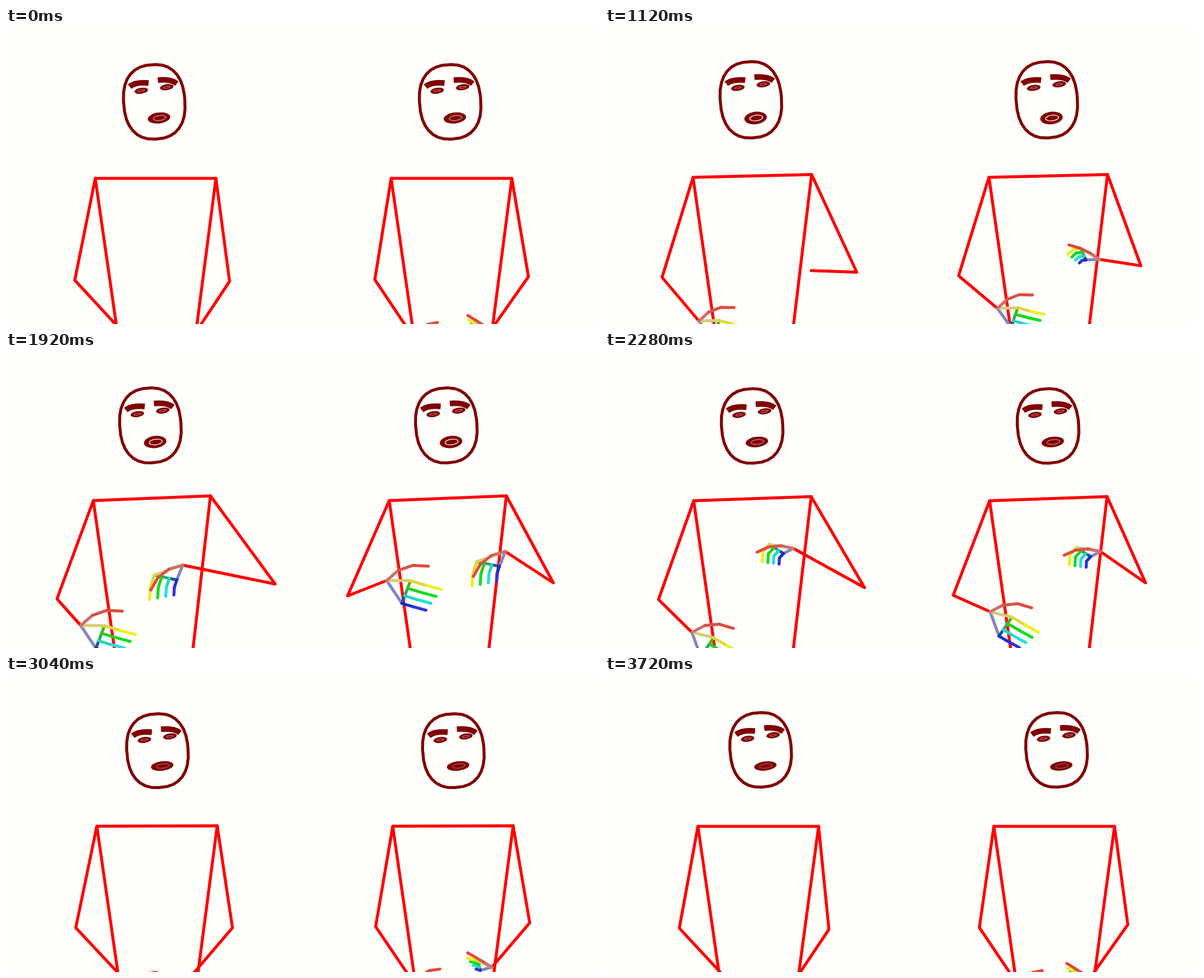
These frames come from a looping animation (1000x500 px, 3.76 s). An HTML page with a canvas:

```html
<!DOCTYPE html>
<html lang="en">
<head>
<meta charset="utf-8">
<title>Pose pair</title>
<style>
html, body { margin: 0; width: 100%; height: 100%; overflow: hidden; background: #fefefb; }
canvas { display: block; width: 100vw; height: 100vh; }
</style>
</head>
<body>
<canvas id="stage" width="1000" height="500"></canvas>
<script>
const ctx = document.getElementById('stage').getContext('2d');
const LOOP = 3760, STEP = 40, PANEL = 499;
const PAPER = '#fefefb', SKIN = '#800000', BONE = '#ff0000';

// left elbow, left wrist, right elbow, right wrist
const ARMS = [
  {
    rest: [116, 426, 212, 530, 377, 428, 308, 532],
    up: [89, 418, 124, 471, 453, 402, 375, 326],
    chest: [86, 417, 126, 462, 454, 392, 298, 360],
    half: [94, 419, 164, 483, 424, 403, 334, 308]
  },
  {
    rest: [622, 425, 688, 524, 881, 420, 818, 510],
    up: [585, 414, 646, 439, 915, 389, 844, 309],
    chest: [576, 412, 642, 386, 923, 390, 842, 337],
    half: [597, 410, 656, 483, 902, 390, 830, 337]
  }
];

// thumb [aim, segment, bend], first and last knuckle, fingers [aim, first and last segment, bend]
const SPREAD = [[-40, 26, 22], [40, 1, 25, 39], [18, 27, 21, -2]];
const GRIPS = {
  rest: [[212, 24, 0], [-34, -14, -30, 9], [205, 14, 5, 0]],
  up: [[216, 21, -15], [-38, -27, -24, -4], [152, 15, 9, -60]],
  chest: [[164, 24, -22], [-48, 17, -10, 25], [108, 21, 13, -14]]
};
GRIPS.half = GRIPS.up;
const TILT = { rest: -16, up: 6, chest: -1, half: 24 };
const SIZE = { rest: .64, up: 1, chest: 1, half: .9 };
const RAISE = { rest: 0, up: 1, chest: 1, half: .8 };

// wrist to knuckle, then two finger segments
const COLORS = [
  ['#cd7068', '#d4544a', '#df4b3a'],
  ['#d4cd74', '#dada35', '#f0ee20'],
  ['#5aa81e', '#1fd21f', '#14dc20'],
  ['#2aa868', '#28d4c0', '#20e0e0'],
  ['#2050a0', '#1030c8', '#3030e0']
];

const rad = deg => deg * Math.PI / 180;
const ease = u => u * u * (3 - 2 * u);
const mix = (a, b, u) => Array.isArray(a) ? a.map((v, i) => mix(v, b[i], u)) : a + (b - a) * u;

// eased value at time t from [time, value] keys
function track(t, ...keys) {
  const i = Math.max(1, keys.findIndex(key => key[0] > t));
  const [t0, a] = keys[i - 1], [t1, b] = keys[i];
  return mix(a, b, ease((t - t0) / (t1 - t0)));
}
const gesture = (t, p) => track(t, [0, p.rest], [760, p.rest], [1400, p.up], [1920, p.chest],
  [2600, p.half], [3150, p.rest], [LOOP, p.rest]);

function line(pts, color = BONE) {
  ctx.beginPath();
  for (let i = 0; i < pts.length; i += 2) ctx.lineTo(pts[i], pts[i + 1]);
  ctx.strokeStyle = color;
  ctx.lineWidth = 5;
  ctx.stroke();
}

function oval(x, y, rx, ry, tilt) {
  ctx.beginPath();
  ctx.ellipse(x, y, rx, ry, tilt, 0, 7);
}

function eye(x, y) {
  oval(x, y, 11.5, 5, -.14);
  ctx.fill();
  oval(x, y, 6, 1.6, -.14);
  ctx.strokeStyle = PAPER;
  ctx.lineWidth = .5;
  ctx.stroke();
}

function brow(x, y, dir) {
  ctx.beginPath();
  ctx.moveTo(x - 17 * dir, y + 6);
  ctx.quadraticCurveTo(x - 7 * dir, y - 2, x + 15 * dir, y);
  ctx.strokeStyle = SKIN;
  ctx.lineWidth = 9.5;
  ctx.stroke();
}

function mouth(x, y, height) {
  oval(x, y, 19, height / 2 - .8, -.12);
  ctx.fill();
  oval(x + 1, y, 11, height * .21, -.12);
  ctx.strokeStyle = PAPER;
  ctx.lineWidth = Math.max(.4, (height - 15) / 6);
  ctx.stroke();
}

function head(left, nod, open) {
  const top = 62 + nod, chin = 187.5 + nod * .4;
  const cx = left + 52, cy = (top + chin) / 2, half = (chin - top) / 2;
  const round = v => Math.sign(v) * Math.abs(v) ** (2 / 2.4);
  ctx.beginPath();
  for (let a = 0; a < 6.28; a += .2) {
    const x = round(Math.cos(a)) * 51.5, y = round(Math.sin(a)) * half;
    ctx.lineTo(cx + x + .08 * y, cy + y - .08 * x);
  }
  ctx.closePath();
  ctx.strokeStyle = ctx.fillStyle = SKIN;
  ctx.lineWidth = 5;
  ctx.stroke();

  const ey = 106 + nod;
  eye(left + 30, ey);
  eye(left + 73, ey - 6);
  ctx.lineCap = 'butt';
  brow(left + 27.5, ey - 13, 1);
  brow(left + 73, ey - 18, -1);
  ctx.lineCap = 'round';
  mouth(left + 60, 152, open);
}

function chain(x, y, aim, length, bend, count) {
  const pts = [x, y];
  for (let i = 0; i < count; i++) {
    const a = rad(aim + bend * i);
    pts.push(x += Math.cos(a) * length, y += Math.sin(a) * length);
  }
  return pts;
}

function hand(x, y, [thumb, [ax, ay, bx, by], [aim, first, last, bend]], size, tilt = 0) {
  const fingers = [chain(0, 0, ...thumb, 3)];
  for (let k = 0; k < 4; k++) {
    const u = k / 3;
    fingers.push(chain(mix(ax, bx, u), mix(ay, by, u), aim, mix(first, last, u), bend, 2));
  }
  ctx.save();
  ctx.translate(x, y);
  ctx.rotate(rad(tilt));
  const scale = pts => pts.map(v => v * size);
  line(scale([0, 0, ...fingers[4].slice(0, 2)]), '#8484c4');
  for (let f = 4; f >= 0; f--) {
    const root = f > 1 ? fingers[f - 1].slice(0, 2) : [0, 0];
    const pts = f ? [...root, ...fingers[f]] : fingers[0];
    COLORS[f].forEach((color, s) => line(scale(pts.slice(s * 2, s * 2 + 4)), color));
  }
  ctx.restore();
}

function figure(t, side) {
  const x = side * PANEL;
  const sway = track(t, [0, 0], [1920, -6.5], [2600, 2], [LOOP, 12.5]);
  const nod = track(t, [0, 0], [760, 1], [1140, -5], [1400, -2], [3040, 2], [LOOP, 0]);
  const open = track(t, [0, 20], [760, 19], [1400, 25], [2600, 18], [LOOP, 17]);
  const raise = gesture(t, RAISE), size = gesture(t, SIZE);
  const idle = 1 - raise;
  const drift = sway * .8 * idle;
  const fidget = 6 * idle * Math.sin(Math.PI * t / 760) ** 2;
  const [lx, ly, lwx, lwy, rx, ry, rwx, rwy] = gesture(t, ARMS[side]);
  const a = [x + 150.5 + sway / 2, 254 - 3 * raise];
  const b = [x + 354 + sway / 2 - 6 * raise, 254 - 11 * raise];

  head(x + 198 + sway, nod, open);
  line([x + 186 + sway / 2, 501, ...a, ...b, x + 322 + sway * .4 - 4 * raise, 501]);
  line([...a, lx + drift - fidget, ly, lwx + drift, lwy]);
  line([...b, rx + fidget, ry, rwx, rwy]);

  hand(lwx + drift, lwy, SPREAD, size, gesture(t, TILT));
  const tracked = side || (t >= 1560 && t < 2360);
  if (tracked) hand(rwx, rwy, gesture(t, GRIPS), size);
}

function draw(t) {
  ctx.fillStyle = PAPER;
  ctx.fillRect(0, 0, 1000, 500);
  ctx.lineCap = ctx.lineJoin = 'round';
  figure(t, 0);
  figure(t, 1);
}

const start = performance.now();
function tick() {
  const t = (performance.now() - start) % LOOP;
  draw(Math.floor(t / STEP) * STEP);
  requestAnimationFrame(tick);
}
tick();
</script>
</body>
</html>
```
